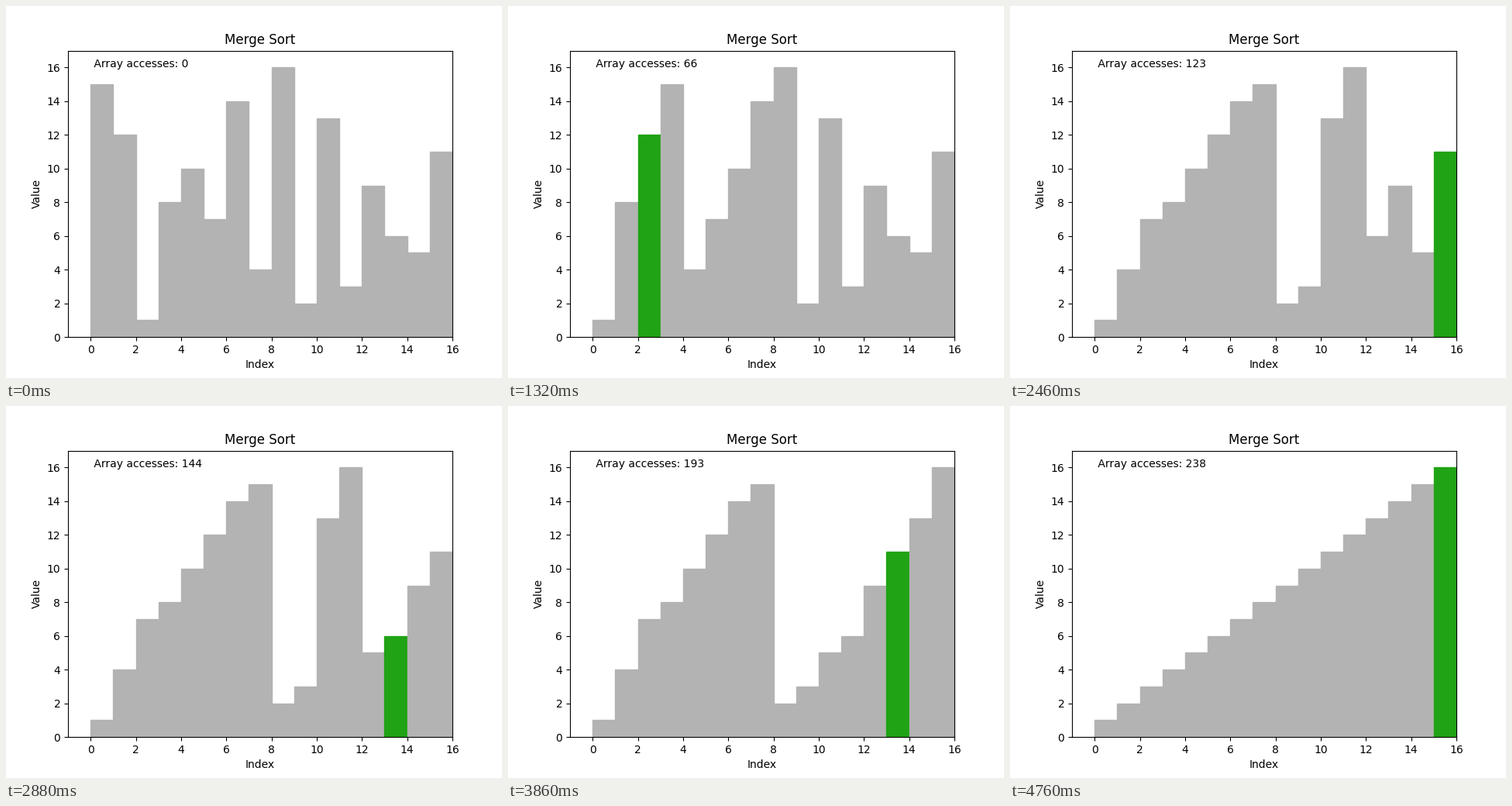
Animation, 640 px wide and 480 px high, one loop 4780 ms. Source, as a matplotlib script:

```python
import matplotlib.pyplot as plt
from matplotlib.animation import FuncAnimation

VALUES = [15, 12, 1, 8, 10, 7, 14, 4, 16, 2, 13, 3, 9, 6, 5, 11]
N = len(VALUES)
GRAY = "0.7"
GREEN = "#20a314"


class TrackedList:
    """List that records the index and a snapshot for every access."""

    def __init__(self, values):
        self.values = list(values)
        self.log = [(None, tuple(values))]

    def track(self, i):
        self.log.append((i, tuple(self.values)))

    def __getitem__(self, i):
        self.track(i)
        return self.values[i]

    def __setitem__(self, i, value):
        self.values[i] = value
        self.track(i)


def merge(arr, start, mid, end):
    merged = []
    i, j = start, mid
    while i < mid and j < end:
        if arr[i] < arr[j]:
            merged.append(arr[i])
            i += 1
        else:
            merged.append(arr[j])
            j += 1
    merged += [arr[k] for k in range(i, mid)]
    merged += [arr[k] for k in range(j, end)]
    for k, value in enumerate(merged, start):
        arr[k] = value


def merge_sort(arr, start, end):
    if end - start > 1:
        mid = (start + end) // 2
        merge_sort(arr, start, mid)
        merge_sort(arr, mid, end)
        merge(arr, start, mid, end)


arr = TrackedList(VALUES)
merge_sort(arr, 0, N)
# closing sweep over the sorted values
for i in range(N):
    arr[i]

fig, ax = plt.subplots(figsize=(6.4, 4.8), dpi=100)
bars = ax.bar(range(N), VALUES, width=1, align="edge", color=GRAY,
              edgecolor=GRAY, linewidth=1)
ax.set(xlim=(-1, N), ylim=(0, N + 1), xlabel="Index", ylabel="Value",
       title="Merge Sort")
label = ax.text(0, N, "")


def update(frame):
    active, heights = arr.log[frame]
    label.set_text(f" Array accesses: {frame}")
    for i, (bar, height) in enumerate(zip(bars, heights)):
        bar.set_height(height)
        bar.set_color(GREEN if i == active else GRAY)
    return [*bars, label]


anim = FuncAnimation(fig, update, frames=len(arr.log), interval=20,
                     repeat=True)
plt.show()
```
